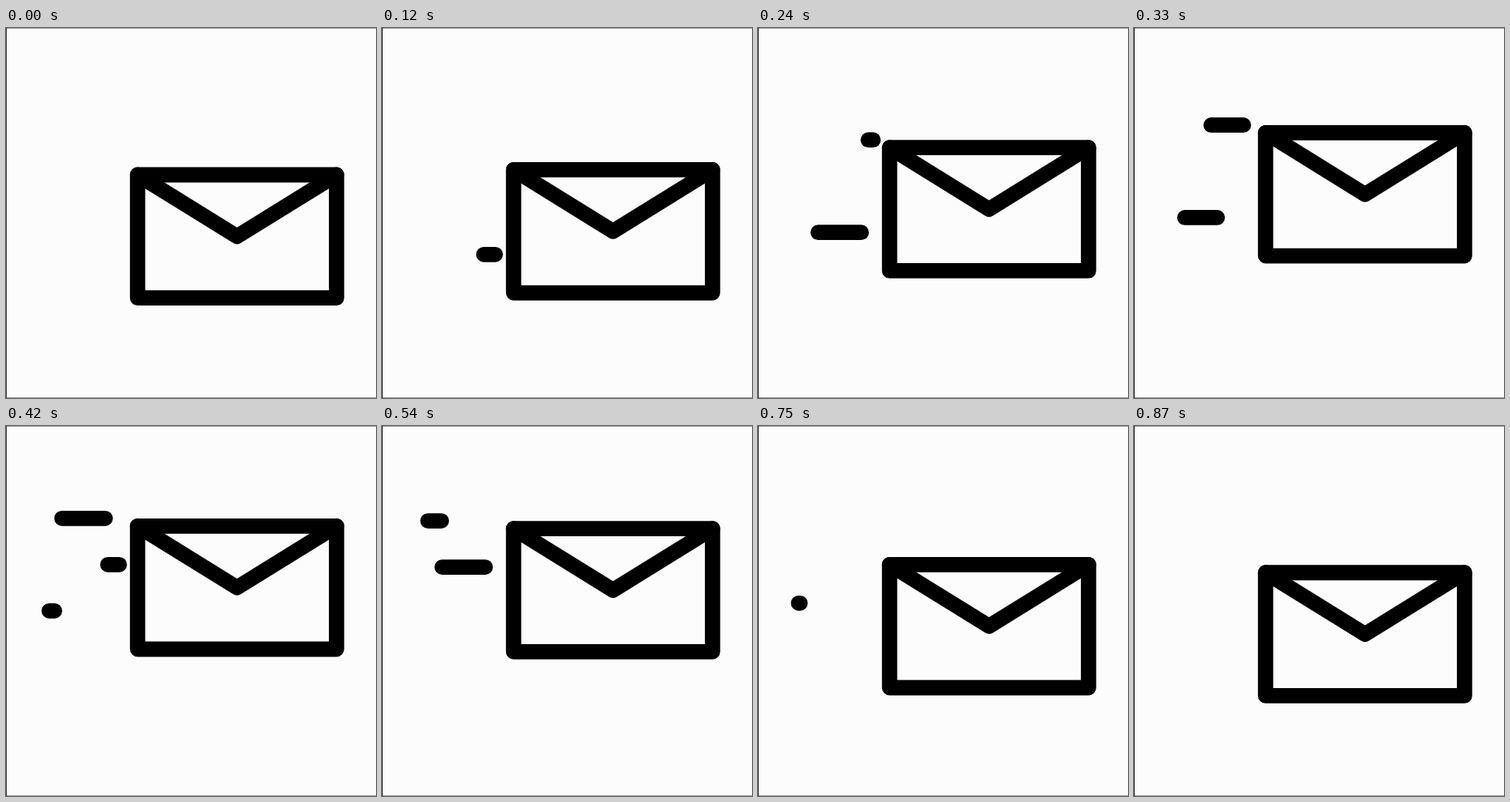
Recreate the animation shown at these times as an HTML page. Size 480 by 480 pixels, loop 900 ms.

```html
<!DOCTYPE html>
<html lang="en">
<head>
<meta charset="utf-8">
<title>Sending mail</title>
<style>
  html, body { margin: 0; width: 100%; height: 100%; overflow: hidden; background: #fcfcfc; }
  svg { display: block; width: 100vw; height: 100vh; }
  #mail { fill: none; stroke: #000; stroke-width: 19.8; stroke-linecap: round; stroke-linejoin: round; }
</style>
</head>
<body>
<svg viewBox="0 0 480 480">
  <path d="M0 .5H480M0 479.5H480" stroke="#999"/>
  <path d="M.5 0V480" stroke="#333"/>
  <g id="mail">
    <path d="M170.7 0H428.8V159.7H170.7Z"/>
    <path d="M170.7 0L299.7 79.9L428.8 0"/>
    <path class="dash"/>
    <path class="dash"/>
    <path class="dash"/>
  </g>
</svg>
<script>
const LOOP = 900, STEP = 30, HALF = 448;
const LOW = 190.5, RISE = 61;

// Ends of a speed line, one key every KEY ms from START
const START = 60, KEY = 60;
const HEAD = [150, 132, 100, 78, 69, 63, 56, 50];
const TAIL = [151, 147, 142, 134, 121, 93, 63, 50];
const LINES = [
  { y: 110, delay: 0 },
  { y: -10, delay: 150 },
  { y: 50, delay: 300 },
];

const mail = document.getElementById('mail');
const dashes = document.querySelectorAll('.dash');

// cubic-bezier(.55, 0, .45, 1)
function ease(x) {
  let lo = 0, hi = 1;
  for (let i = 0; i < 20; i++) {
    const s = (lo + hi) / 2, r = 1 - s;
    if (1.65 * s * r * r + 1.35 * s * s * r + s ** 3 < x) lo = s;
    else hi = s;
  }
  return lo * lo * (3 - 2 * lo);
}

// Catmull-Rom through evenly spaced keys
function spline(keys, pos) {
  const i = Math.floor(pos), f = pos - i;
  const at = n => keys[Math.max(0, Math.min(keys.length - 1, n))];
  const [a, b, c, d] = [at(i - 1), at(i), at(i + 1), at(i + 2)];
  return b + f / 2 * (c - a + f * (2 * a - 5 * b + 4 * c - d + f * (3 * (b - c) + d - a)));
}

function draw(t) {
  const lift = ease(Math.max(0, 1 - Math.abs(t - HALF) / HALF));
  mail.setAttribute('transform', `translate(0 ${LOW - RISE * lift})`);
  LINES.forEach(({ y, delay }, i) => {
    const pos = (t - delay - START) / KEY;
    const visible = pos > 0 && pos < HEAD.length - 1;
    dashes[i].setAttribute('d', visible ? `M${spline(HEAD, pos)} ${y}H${spline(TAIL, pos)}` : '');
  });
}

const begin = performance.now();
function tick() {
  const t = (performance.now() - begin) % LOOP;
  draw(Math.floor(t / STEP) * STEP);
  requestAnimationFrame(tick);
}
tick();
</script>
</body>
</html>
```
